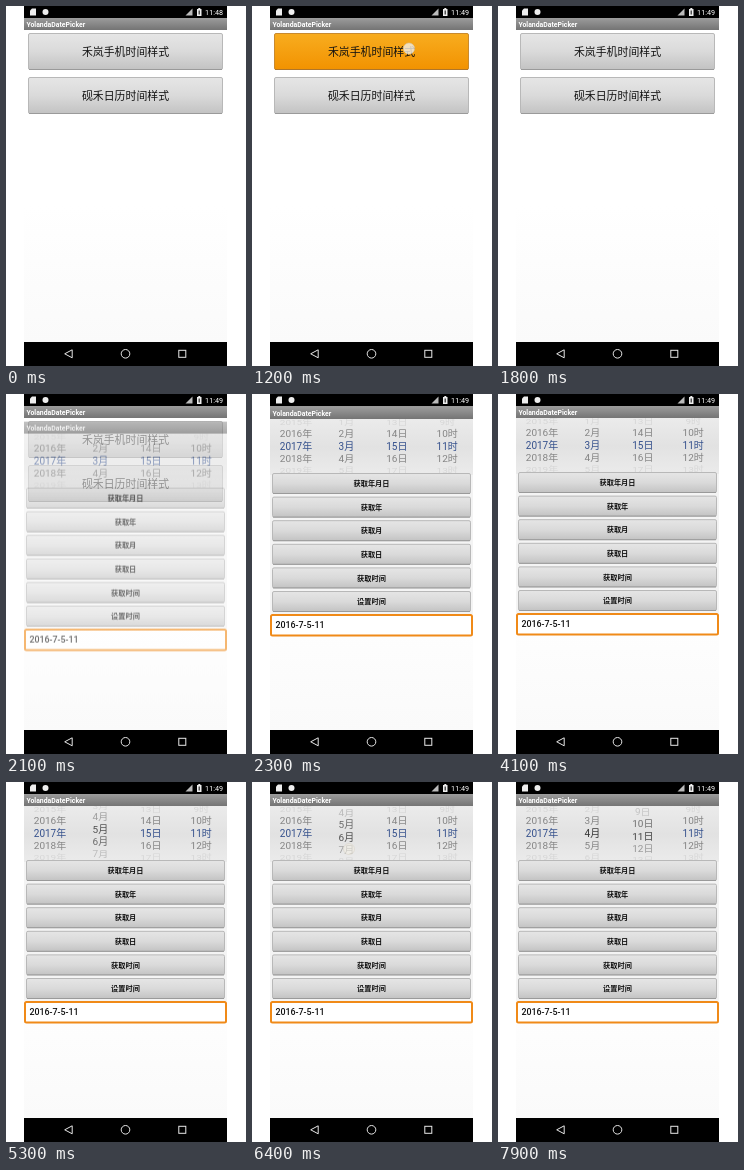
These frames come from a looping animation (240 by 360 pixels, 8 s). An HTML page with a canvas:

```html
<!DOCTYPE html>
<html lang="zh">
<head>
<meta charset="utf-8">
<title>Date picker</title>
<style>
html, body { margin: 0; width: 100%; height: 100%; overflow: hidden; background: #fff; }
canvas { display: block; width: 240px; height: 360px; }
</style>
</head>
<body>
<canvas id="stage"></canvas>
<script>
const W = 240, H = 360, LOOP = 8000, STEP = 100;
const LEFT = 18, RIGHT = 221, WIDE = RIGHT - LEFT;
const BAR = 12, HEAD = 24, WHEEL_END = 80, NAV = 336;
const MID = (LEFT + RIGHT) / 2;
const FONT = 'Roboto, "Noto Sans CJK SC", "Noto Sans CJK", sans-serif';
const ACTIONS = ['获取年月日', '获取年', '获取月', '获取日', '获取时间', '设置时间'];
const ratio = window.devicePixelRatio || 1;

function layer(canvas) {
  canvas.width = W * ratio;
  canvas.height = H * ratio;
  const c = canvas.getContext('2d');
  c.scale(ratio, ratio);
  return c;
}
const screen = layer(document.getElementById('stage'));
const sheet = layer(document.createElement('canvas'));

// Motion
const ramp = (t, from, to) => Math.min(1, Math.max(0, (t - from) / (to - from)));
const smooth = p => p * p * (3 - 2 * p);
const slide = t => 22 * Math.exp(-(((t - 2000) / 170) ** 2));
const fade = t => smooth(ramp(t, 1900, 2250));

// Short upward flicks, then two drags back down.
function monthAt(t) {
  let value = 3 + ramp(t, 4500, 4700);
  for (let from = 4800; from < 5900; from += 400) value += ramp(t, from, from + 300);
  return value - 2 * ramp(t, 6200, 6500) - ramp(t, 6600, 6900);
}
const dayAt = t => 15 - 2.4 * ramp(t, 7000, 7500) - 1.83 * ramp(t, 7700, 7900);

// Drawing helpers
function gradient(c, y0, y1, ...stops) {
  const g = c.createLinearGradient(0, y0, 0, y1);
  stops.forEach((s, i) => g.addColorStop(i / (stops.length - 1), s));
  return g;
}

function rect(c, x, y, w, h, fill) {
  c.fillStyle = fill;
  c.fillRect(x, y, w, h);
}

function text(c, s, x, y, size, color, align = 'center', weight = 400) {
  c.font = `${weight} ${size}px ${FONT}`;
  c.textAlign = align;
  c.fillStyle = color;
  c.fillText(s, x, y + size * 0.37);
}

function box(c, x, y, w, h, fill, stroke, line = 1) {
  c.beginPath();
  c.roundRect(x, y, w, h, 1.5);
  c.fillStyle = fill;
  c.fill();
  c.strokeStyle = stroke;
  c.lineWidth = line;
  c.stroke();
}

function circle(c, x, y, r) {
  c.beginPath();
  c.arc(x, y, r, 0, Math.PI * 2);
}

function polygon(c, ...points) {
  c.beginPath();
  points.forEach(([x, y]) => c.lineTo(x, y));
  c.closePath();
}

function button(c, label, y, w, h, size, weight, pressed) {
  const x = MID - w / 2;
  const fill = pressed
    ? gradient(c, y, y + h, '#f8ad20', '#f29200')
    : gradient(c, y, y + h, '#e6e6e6', '#dadada', '#c2c2c2');
  box(c, x + 0.5, y + 0.5, w - 1, h - 1, fill, pressed ? '#c88a30' : '#b8b8b8');
  rect(c, x + 1, y + h - 1, w - 2, 1, pressed ? '#b0762a' : '#9a9a9a');
  text(c, label, MID, y + h / 2, size, '#111', 'center', weight);
}

function page(c) {
  rect(c, LEFT, BAR, WIDE, NAV - BAR, gradient(c, 200, NAV, '#fff', '#fafafa'));
  rect(c, LEFT, BAR, WIDE, HEAD - BAR, gradient(c, BAR, HEAD, '#9c9c9c', '#747474'));
  text(c, 'YolandaDatePicker', 20.4, 18.8, 6.9, '#fff', 'left', 700);
}

function pointer(c, x, y, alpha) {
  c.globalAlpha = alpha;
  circle(c, x, y, 5.5);
  c.fillStyle = '#f2eee4';
  c.fill();
  c.strokeStyle = '#cfc8b8';
  c.lineWidth = 0.7;
  c.stroke();
  c.globalAlpha = 1;
}

function menu(c, t) {
  page(c);
  button(c, '禾岚手机时间样式', 27, 195, 37, 10.9, 500, t >= 1200 && t < 1500);
  button(c, '砚禾日历时间样式', 71, 195, 37, 10.9, 500, false);
  if (t >= 1200 && t < 1400) pointer(c, 157, 42.5, 0.8);
}

// Rows sit on a cylinder seen from the front and fade with distance.
function wheel(c, column, value, unit, touched) {
  const angle = 0.35, radius = 37;
  for (let n = Math.ceil(value - 2.4); n <= value + 2.4; n++) {
    const d = n - value, far = Math.abs(d);
    const grey = Math.round(50 + 82 * Math.min(far, 2));
    c.save();
    c.translate(44 + 50.4 * column, 51.2 + radius * Math.sin(d * angle));
    c.scale(1, Math.cos(d * angle));
    text(c, n + unit, 0, 0, 10, !touched && far < 0.5 ? '#34508c' : `rgb(${grey},${grey},${grey})`);
    c.restore();
  }
}

function wheels(c, t) {
  c.save();
  c.beginPath();
  c.rect(LEFT, HEAD, WIDE, WHEEL_END - HEAD);
  c.clip();
  rect(c, LEFT, HEAD, WIDE, WHEEL_END - HEAD,
    gradient(c, HEAD, WHEEL_END, '#ebebeb', '#e2e2e2', '#ebebeb'));
  wheel(c, 0, 2017, '年', false);
  wheel(c, 1, monthAt(t), '月', t >= 4600);
  wheel(c, 2, dayAt(t), '日', t >= 7100);
  wheel(c, 3, 11, '时', false);
  c.restore();
}

function picker(c, t) {
  page(c);
  wheels(c, t);
  rect(c, LEFT, WHEEL_END, WIDE, 139, '#f4f4f4');
  ACTIONS.forEach((label, i) => button(c, label, 78 + 23.6 * i, 199, 21, 7.2, 700, false));
  box(c, LEFT + 1, 219.9, WIDE - 2, 20.6, '#fff', '#f08a18', 2);
  text(c, '2016-7-5-11', 23.4, 230.2, 8.9, '#111', 'left', 500);
  if (t >= 6200 && t < 6600) pointer(c, 97, 67 + (5.67 - monthAt(t)) * 12.8, 0.55);
}

function statusBar(c, t) {
  rect(c, LEFT, 0, WIDE, BAR, '#000');
  c.fillStyle = '#eee';
  polygon(c, [26, 2.5], [30, 2.5], [30, 9.5], [24, 9.5], [24, 4.5]);
  c.fill();
  circle(c, 39.5, 6, 3);
  c.fill();
  c.fillStyle = '#bbb';
  polygon(c, [186.5, 2.5], [186.5, 9.5], [179.5, 9.5]);
  c.fill();
  rect(c, 191, 3, 4.5, 7, '#eee');
  rect(c, 192.3, 2, 2, 1, '#eee');
  rect(c, 192.5, 4.5, 1.5, 4, '#555');
  text(c, t < 200 ? '11:48' : '11:49', 217, 6.2, 7.2, '#fff', 'right');
}

function navBar(c) {
  const y = 347.8, r = 4;
  rect(c, LEFT, NAV, WIDE, H - NAV, '#000');
  c.strokeStyle = '#e8e8e8';
  c.lineWidth = 1;
  polygon(c, [58.7, y], [66.2, y - r], [66.2, y + r]);
  c.stroke();
  circle(c, MID, y, r + 0.3);
  c.stroke();
  c.strokeRect(172.8, y - 3.5, 7, 7);
}

function draw(t) {
  rect(screen, 0, 0, W, H, '#fff');
  menu(screen, t);
  const alpha = fade(t);
  if (alpha > 0) {
    sheet.clearRect(0, 0, W, H);
    picker(sheet, t);
    // The old page fades only where the new one covers it or has settled.
    if (alpha === 1) rect(screen, LEFT, HEAD, WIDE, NAV - HEAD, '#fff');
    screen.globalAlpha = alpha;
    screen.drawImage(sheet.canvas, 0, slide(t), W, H);
    screen.globalAlpha = 1;
  }
  statusBar(screen, t);
  navBar(screen);
  rect(screen, 0, 0, LEFT, H, '#fff');
  rect(screen, RIGHT, 0, W - RIGHT, H, '#fff');
}

const start = performance.now();
function tick() {
  const t = (performance.now() - start) % LOOP;
  draw(Math.floor(t / STEP) * STEP);
  requestAnimationFrame(tick);
}
tick();
</script>
</body>
</html>
```
